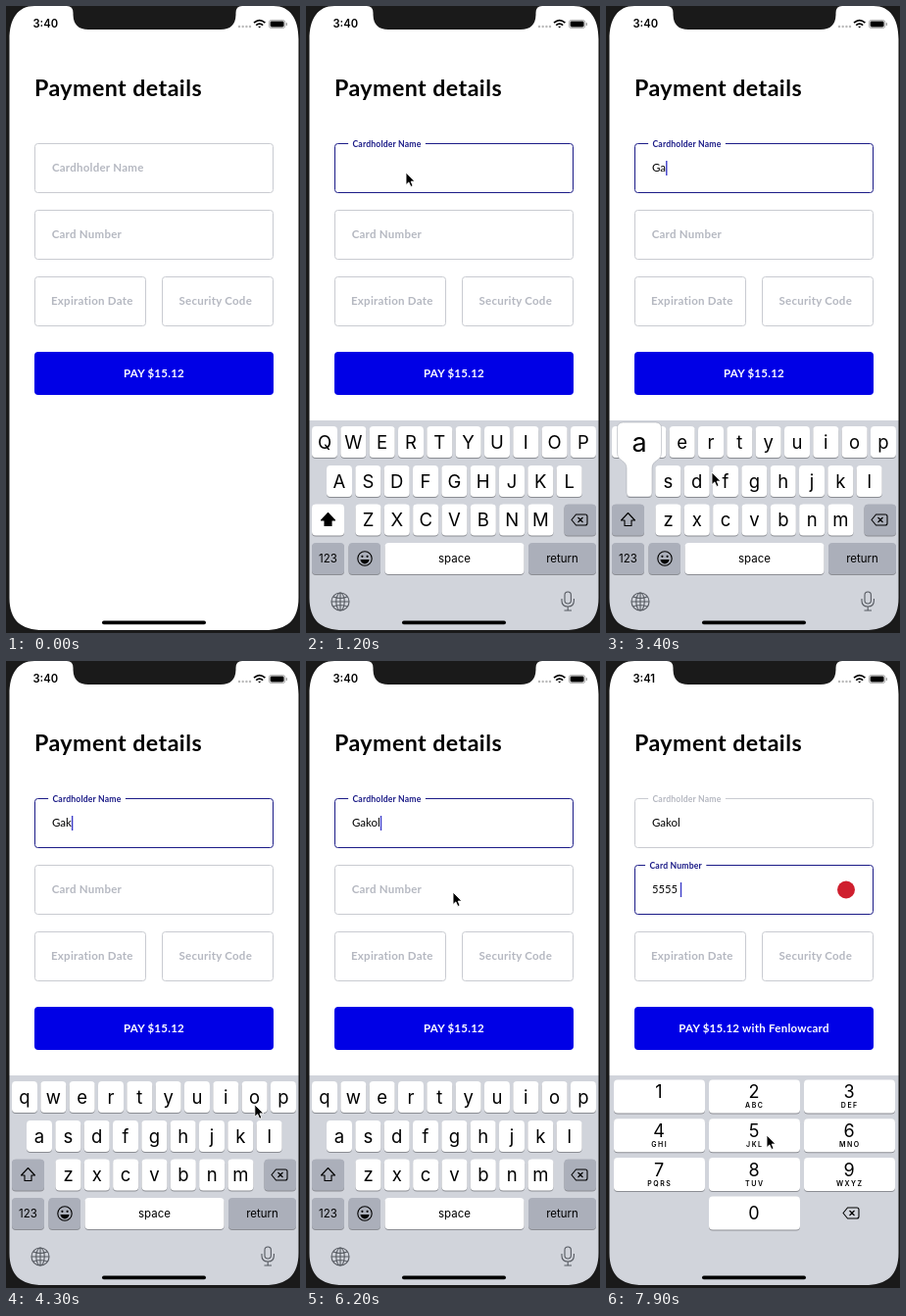
Write an HTML page that moves like this. It is 300x640 px and loops after 8 s.

```html
<!DOCTYPE html>
<html lang="en">
<head>
<meta charset="utf-8">
<title>Payment form</title>
<style>
  html, body { margin: 0; width: 100%; height: 100%; overflow: hidden; background: #fff; }
  svg { display: block; width: 300px; height: 640px; }
  text { font-family: Inter, Roboto, sans-serif; white-space: pre; }
  .form text { font-family: Lato, "Open Sans", sans-serif; }
  .form .bold { font-weight: 700; letter-spacing: .25px; }
</style>
</head>
<body>
<svg id="stage" viewBox="0 0 300 640" xmlns="http://www.w3.org/2000/svg"></svg>
<script>
const LOOP = 8000, STEP = 100;
const NAME = 'Gakol', BRAND = 'Fenlowcard';
const NAVY = '#1b1b87', GREY = '#c9cbd1', HINT = '#b5b8c1';
const stage = document.getElementById('stage');

// Timetable in ms
const FOCUS_NAME = 500, KEYS_UP = 650, FOCUS_CARD = 6500, CLOCK = 7500;
const PRESSES = [2300, 3100, 3800, 4500, 5200];
const DIGITS = [7000, 7300, 7500, 7700];
const POINTER = [
  [100, 290, 330], [500, 102, 170], [1300, 102, 170], [1900, 148, 489],
  [2100, 152, 489], [2500, 152, 489], [3000, 36, 486], [3200, 36, 486],
  [3400, 108, 476], [3700, 242, 484], [4000, 242, 484], [4400, 256, 447],
  [4700, 256, 447], [5100, 274, 483], [5500, 274, 483], [6100, 150, 236],
  [6500, 150, 236], [6900, 164, 484], [8000, 164, 484]
];

const text = (x, y, size, str, attrs = '') =>
  `<text x="${x}" y="${y + size * .355}" font-size="${size}" ${attrs}>${str}</text>`;
const mid = 'text-anchor="middle"';
const box = (x, y, w, h, r, attrs) =>
  `<rect x="${x}" y="${y}" width="${w}" height="${h}" rx="${r}" ${attrs}/>`;
const key = (x, y, w, h, fill = '#fff', id = '') =>
  box(x, y + 1, w, h, 4, 'fill="#8b8d93"') + box(x, y, w, h, 4, `fill="${fill}" ${id && `id="${id}"`}`);
const path = (d, attrs = 'fill="none" stroke="#000"') => `<path d="${d}" ${attrs}/>`;

const backspace = (x, y) => `<g transform="translate(${x} ${y})">` +
  path('M-8 0L-3.5 -5.5H6Q8 -5.5 8 -3.5V3.5Q8 5.5 6 5.5H-3.5ZM-1.5 -2.5L3.5 2.5M3.5 -2.5L-1.5 2.5',
    'fill="none" stroke="#000" stroke-width="1.1" stroke-linejoin="round"') + '</g>';

// Letter key centres
const ROWS = [['QWERTYUIOP', 19, 429], ['ASDFGHJKL', 34, 469], ['ZXCVBNM', 63.5, 508.5]];
const spots = {};
for (const [chars, x0, y] of ROWS)
  [...chars].forEach((c, i) => spots[c] = { x: x0 + i * 29.33, y });

function letterKeys() {
  let out = '';
  for (const [c, { x, y }] of Object.entries(spots))
    out += key(x - 13, y, 26, 32) + text(x, y + 16, 18.5, c, `${mid} class="letter"`);
  return out +
    key(6, 508.5, 33, 32, '#fff', 'shift') +
    path('M22.5 517.5L15.5 525H19V530.5H26V525H29.5Z',
      'id="arrow" stroke="#000" stroke-width="1.1" stroke-linejoin="round"') +
    key(263.5, 508.5, 32.5, 32, '#abafba') + backspace(279, 524.5) +
    key(6, 548, 33, 32, '#abafba') + text(22.5, 564, 11.5, '123', mid) +
    key(43.5, 548, 32.5, 32, '#abafba') +
    '<circle cx="60" cy="564" r="7.2" fill="none" stroke="#000" stroke-width="1.1"/>' +
    '<circle cx="57.4" cy="561.8" r="1.1"/><circle cx="62.6" cy="561.8" r="1.1"/>' +
    path('M55.4 565H64.6Q63.6 569.4 60 569.4T55.4 565Z', '') +
    key(80.5, 548, 142, 32) + text(151.5, 563.5, 11.5, 'space', mid) +
    key(227, 548, 69, 32, '#abafba') + text(261.5, 563.5, 11.5, 'return', mid) +
    '<g fill="none" stroke="#555960" stroke-width="1.1"><circle cx="35" cy="608" r="9"/>' +
    '<ellipse cx="35" cy="608" rx="4.2" ry="9"/>' +
    '<path d="M35 599V617M26 608H44M28 603Q35 606 42 603M28 613Q35 610 42 613"/>' +
    '<rect x="264" y="598" width="6.4" height="12" rx="3.2"/>' +
    '<path d="M261 605V607Q261 613 267.2 613T273.4 607V605M267.2 613V617M263.5 617H271"/></g>';
}

const PAD = ['1', '2ABC', '3DEF', '4GHI', '5JKL', '6MNO', '7PQRS', '8TUV', '9WXYZ'];
function numberKeys() {
  let out = '';
  PAD.forEach((s, i) => {
    const x = 8 + i % 3 * 97, y = 427.5 + Math.floor(i / 3) * 39.7;
    out += key(x, y, 93, 34, '#fff', 'pad' + s[0]) + text(x + 46, y + 12.5, 18, s[0], mid) +
      text(x + 46.8, y + 26.5, 7, s.slice(1), mid + ' font-weight="600" letter-spacing="1.5"');
  });
  return out + key(105, 546.6, 93, 34) + text(151, 563.5, 18, '0', mid) + backspace(250, 563.5);
}

const frame = 'M0 0H300V640H0Z M3.5 34C3.5 13 12 0 29 0H62Q68.5 0 68.5 7V9Q69 24 84 24H219' +
  'Q234 24 234.5 9V7Q234.5 0 241 0H273C290 0 298.5 13 298.5 34V604C298.5 627 287 637 264 637H38C15 637 3.5 627 3.5 604Z';

const field = (id, x, y, w) =>
  box(x + .5, y + .5, w - 1, 50, 3, `id="${id}" fill="#fff" stroke="${GREY}"`);
const label = (id, w, str) =>
  `<g id="${id}">${box(-w / 2 - 5, -7, w + 10, 14, 0, 'fill="#fff"')}${text(0, 0, 11.5, str, mid + ' class="bold"')}</g>`;

stage.innerHTML = `
<rect width="300" height="640" fill="#fff"/>
<g class="form">
  ${text(29, 84, 23.2, 'Payment details', 'font-weight="700" letter-spacing=".45"')}
  ${field('nameBox', 29, 140, 244)}${label('nameLabel', 95, 'Cardholder Name')}
  ${field('cardBox', 29, 208, 244)}${label('cardLabel', 73, 'Card Number')}
  ${field('dateBox', 29, 276, 114)}${text(46, 300.5, 11.5, 'Expiration Date', `class="bold" fill="${HINT}"`)}
  ${field('codeBox', 159, 276, 114)}${text(176.5, 300.5, 11.5, 'Security Code', `class="bold" fill="${HINT}"`)}
  ${text(47, 165, 11.5, '', 'id="nameValue"')}${text(47, 233, 11.2, '', 'id="cardValue"')}
  <rect id="caret" width="1.4" height="15" fill="#3c3cc8"/>
  <circle id="badge" cx="245" cy="233.5" r="9" fill="#cf1f2e"/>
  ${box(29, 353, 244, 44, 4, 'fill="#0000e6"')}
  ${text(151, 374.5, 11.5, '', `${mid} id="pay" class="bold" fill="#fff"`)}
</g>
<g id="board">
  <rect y="423" width="300" height="240" fill="#d1d4db"/>
  <g id="letters">${letterKeys()}</g>
  <g id="numbers">${numberKeys()}</g>
</g>
<g id="popup">
  ${path('M-22.5 -38Q-22.5 -44 -16.5 -44H16.5Q22.5 -44 22.5 -38V-13C22.5 -4 13 -6 13 3V28Q13 32 9 32H-9Q-13 32 -13 28V3C-13 -6 -22.5 -4 -22.5 -13Z',
    'fill="#fff" stroke="#9b9ea6" stroke-opacity=".6" stroke-width=".8"')}
  ${text(0, -24, 27, '', mid + ' id="popupChar"')}
</g>
${path(frame, 'fill="#1a1a1a" fill-rule="evenodd"')}
${text(27.5, 18.5, 11.2, '', 'id="clock" font-weight="600"')}
${[238, 241.7, 245.4, 249].map(x => `<circle cx="${x}" cy="21" r="1.2" fill="#b9b9b9"/>`).join('')}
<g fill="none" stroke="#000" stroke-width="1.7">
  <path d="M253 17.2Q258.7 12.2 264.4 17.2M255.2 19.6Q258.7 16.6 262.2 19.6"/>
  <path d="M257.1 20.8L258.7 22.5L260.3 20.8Z" fill="#000" stroke="none"/>
</g>
${box(268.4, 14.4, 16.4, 8.2, 2.4, 'fill="none" stroke="#999" stroke-width=".8"')}
${box(269.6, 15.6, 14, 5.8, 1.4, '')}${box(285.7, 17, 1.2, 3, .6, 'fill="#999"')}
${box(98, 627.6, 106, 3.6, 1.8, '')}
<path id="pointer" d="M0 0V12.6L2.9 9.9L4.9 14.5L7.1 13.5L5.2 9.1H9Z" stroke="#fff" stroke-width=".9"/>`;

const $ = id => document.getElementById(id);
const set = (id, attrs) => { for (const k in attrs) $(id).setAttribute(k, attrs[k]); };
const show = (id, on) => set(id, { visibility: on ? 'visible' : 'hidden' });
const clamp = p => Math.min(1, Math.max(0, p));
const ease = p => p * p * (3 - 2 * p);

function pointerAt(t) {
  let i = 0;
  while (i < POINTER.length - 2 && t >= POINTER[i + 1][0]) i++;
  const [t0, x0, y0] = POINTER[i], [t1, x1, y1] = POINTER[i + 1];
  const p = ease(clamp((t - t0) / (t1 - t0)));
  return [x0 + (x1 - x0) * p, y0 + (y1 - y0) * p];
}

function floatLabel(id, x, y, t, start, color) {
  const p = ease(clamp((t - start) / 200));
  set(id, {
    transform: `translate(${x - 11.2 * p} ${y - 23.5 * p}) scale(${1 - .25 * p})`,
    fill: color
  });
}

let lastCase;
function setCase(upper) {
  if (upper === lastCase) return;
  lastCase = upper;
  document.querySelectorAll('.letter').forEach(el => {
    el.textContent = upper ? el.textContent.toUpperCase() : el.textContent.toLowerCase();
  });
  set('shift', { fill: upper ? '#fff' : '#abafba' });
  set('arrow', { fill: upper ? '#000' : 'none' });
}

function draw(t) {
  const onCard = t >= FOCUS_CARD, onName = t >= FOCUS_NAME && !onCard;
  const typed = PRESSES.filter(p => t >= p + 100).length;
  const digits = DIGITS.filter(p => t >= p + 100).length;
  const branded = digits >= 2;

  floatLabel('nameLabel', 93.7, 164.5, t, FOCUS_NAME, onName ? NAVY : HINT);
  floatLabel('cardLabel', 82.4, 232.5, t, FOCUS_CARD, onCard ? NAVY : HINT);
  set('nameBox', { stroke: onName ? NAVY : GREY });
  set('cardBox', { stroke: onCard ? NAVY : GREY });
  $('nameValue').textContent = NAME.slice(0, typed);
  $('cardValue').textContent = '5'.repeat(digits) + (digits === 4 ? ' ' : '');
  $('pay').textContent = 'PAY $15.12' + (branded ? ' with ' + BRAND : '');
  $('clock').textContent = t >= CLOCK ? '3:41' : '3:40';
  show('badge', branded);

  const value = $(onCard ? 'cardValue' : 'nameValue');
  const events = [FOCUS_NAME, FOCUS_CARD, ...PRESSES, ...DIGITS].filter(e => e <= t);
  const idle = t - Math.max(...events);
  set('caret', { x: 47 + (value.textContent ? value.getComputedTextLength() : 0), y: onCard ? 226 : 158 });
  show('caret', (onName || onCard) && idle % 1000 <= 600);

  const rise = 1 - Math.pow(1 - clamp((t - KEYS_UP) / 450), 3.14);
  set('board', { transform: `translate(0 ${217 * (1 - rise)})` });
  show('letters', !onCard);
  show('numbers', onCard);
  setCase(typed === 0);
  set('pad5', { fill: DIGITS.some(d => t >= d && t < d + 100) ? '#b1c0cd' : '#fff' });

  const hit = PRESSES.findIndex(p => t >= p && t < p + 400);
  show('popup', hit >= 0);
  if (hit >= 0) {
    const { x, y } = spots[NAME[hit].toUpperCase()];
    set('popup', { transform: `translate(${x} ${y})` });
    $('popupChar').textContent = NAME[hit];
  }

  const [px, py] = pointerAt(t);
  set('pointer', { transform: `translate(${px} ${py})` });
  show('pointer', t >= 100);
}

const began = performance.now();
function tick() {
  const t = (performance.now() - began) % LOOP;
  draw(Math.floor(t / STEP) * STEP);
  requestAnimationFrame(tick);
}
tick();
</script>
</body>
</html>
```
